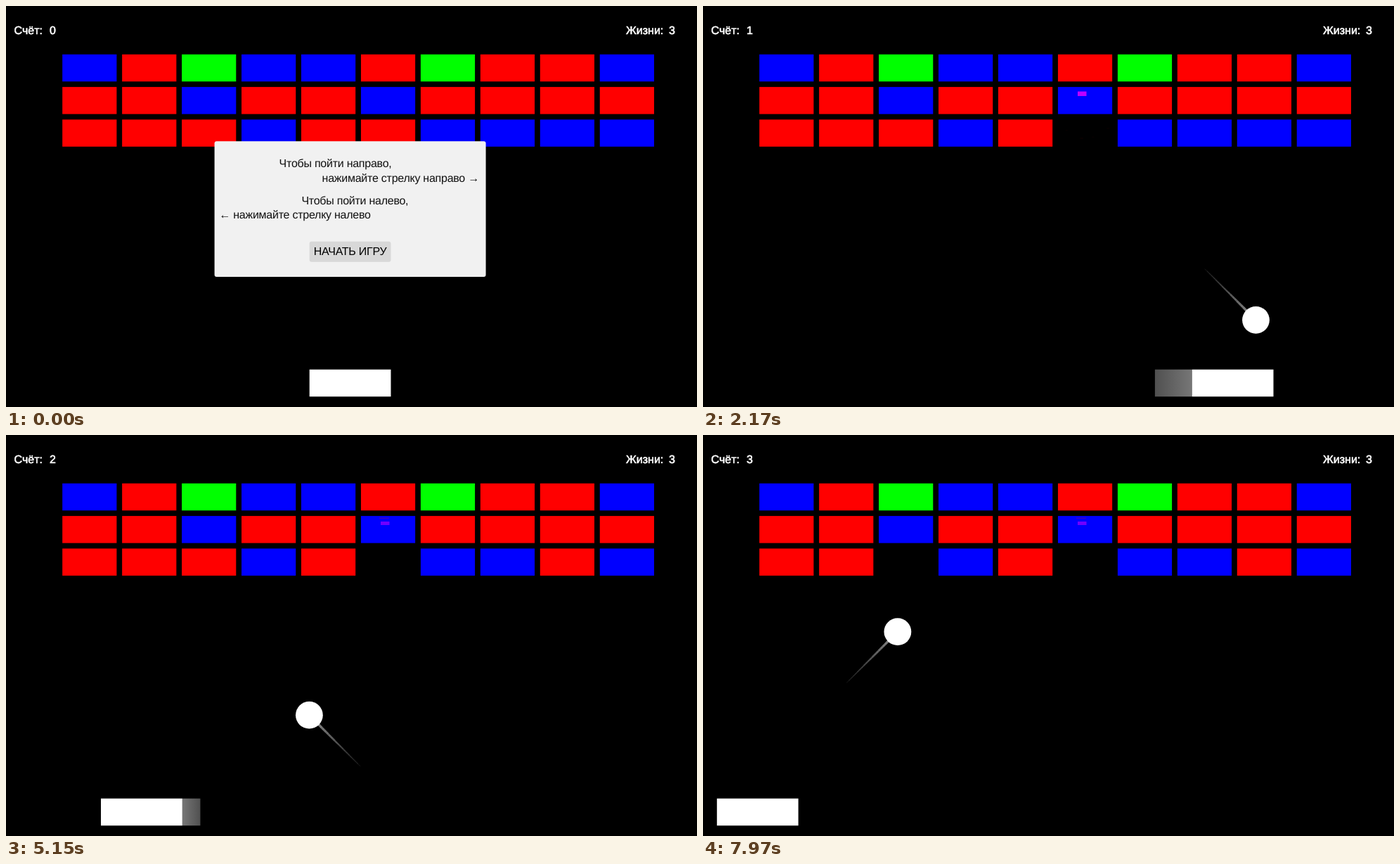
An HTML page with a canvas that plays this animation: 983x570 px, repeating every 8 s.

```html
<!DOCTYPE html>
<html lang="ru">
<head>
<meta charset="utf-8">
<title>Арканоид</title>
<style>
html, body { margin: 0; width: 100%; height: 100%; overflow: hidden; background: #000; }
canvas { display: block; }
</style>
</head>
<body>
<canvas id="stage" width="983" height="570"></canvas>
<script>
const ctx = document.getElementById('stage').getContext('2d');
const LOOP = 8000;
const TICK = 68.7;
const DIALOG_END = 13;
const SERVE = 14;

const BALL = { x: 489.5, y: 288.7, r: 19.4, speed: 16.5, tail: 4.4 };
const FIELD = { left: 15.9, right: 963.7, top: 219, bottom: 498 };
const BRICK = { x: 80.2, y: 68.8, w: 77.2, h: 38.5, dx: 84.95, dy: 46.3 };
const PADDLE = { x: 431.7, y: 516.7, w: 115.8, h: 38.5, speed: 52.8 };

const COLORS = { r: '#f00', g: '#0f0', b: '#00f' };
const ROWS = ['brgbbrgrrb', 'rrbrrbrrrr', 'rrrbrrbbbb'];

// Paddle moves: [start tick, x to reach].
const MOVES = [[27, 794], [54.86, 497.5], [67.62, 135], [88.6, 52.8], [92.3, 19.8]];

const clamp = (v, lo, hi) => Math.min(hi, Math.max(lo, v));

// Reflects a straight run between two walls.
function fold(v, lo, hi) {
  const span = hi - lo;
  const m = (((v - lo) % (2 * span)) + 2 * span) % (2 * span);
  return lo + (m < span ? m : 2 * span - m);
}

function ballAt(n) {
  const run = Math.max(0, n - SERVE) * BALL.speed;
  return [
    fold(BALL.x + run, FIELD.left, FIELD.right),
    fold(BALL.y - run, FIELD.top, FIELD.bottom)
  ];
}

function paddleAt(n) {
  return MOVES.reduce((x, [start, goal]) => {
    const reach = Math.max(0, n - start) * PADDLE.speed;
    return x + clamp(goal - x, -reach, reach);
  }, PADDLE.x);
}

// Every return to the top of the field strikes a brick in the last row.
const HITS = [0, 1, 2].map(k => {
  const run = BALL.y - FIELD.top + 2 * k * (FIELD.bottom - FIELD.top);
  const tick = SERVE + run / BALL.speed;
  const col = Math.floor((ballAt(tick)[0] - BRICK.x) / BRICK.dx);
  return { tick, col, broken: ROWS[2][col] === 'r' };
});

function random(seed) {
  const v = Math.sin(seed * 12.9898) * 43758.5453;
  return v - Math.floor(v);
}

function rect(x, y, w, h, color) {
  ctx.fillStyle = color;
  ctx.fillRect(x, y, w, h);
}

function panel(x, y, w, h, color) {
  ctx.fillStyle = color;
  ctx.beginPath();
  ctx.roundRect(x, y, w, h, 3);
  ctx.fill();
}

function text(str, x, y, color, spacing = '-0.25px') {
  ctx.font = '16px "Liberation Sans", Arial, sans-serif';
  ctx.textRendering = 'geometricPrecision';
  ctx.letterSpacing = spacing;
  ctx.fillStyle = color;
  ctx.fillText(str, x, y);
}

function label(str, x) {
  text(str, x, 40.3, '#fff', '0px');
  ctx.strokeStyle = '#fff';
  ctx.lineWidth = 0.6;
  ctx.strokeText(str, x, 40.3);
}

function drawBricks(n) {
  ROWS.forEach((row, r) => [...row].forEach((kind, c) => {
    const hit = r === 2 && HITS.find(h => h.col === c && n >= h.tick);
    if (hit && hit.broken) return;
    rect(BRICK.x + BRICK.dx * c, BRICK.y + BRICK.dy * r, BRICK.w, BRICK.h, COLORS[hit ? 'r' : kind]);
  }));
}

function drawDebris({ tick, col, broken }, n) {
  const age = (n - tick) / 14;
  if (!broken || age < 0 || age > 1) return;
  const cx = BRICK.x + BRICK.dx * col + BRICK.w / 2;
  const cy = BRICK.y + BRICK.dy * 2 + BRICK.h / 2;
  const spread = 1 - Math.exp(-age * 6);
  for (let i = 0; i < 4; i++) {
    const x = cx + (i * 20 - 30 + 8 * random(i + col)) * spread;
    const y = cy + (random(i + col * 7) * 28 - 20) * spread;
    const w = (6 + 9 * random(i + col * 3)) * (1.3 - age);
    const light = (0.6 + 0.4 * random(i * 5 + col)) * Math.min(1, 2 - 2 * age);
    rect(x - w / 2, y - w / 4, w, w / 2, `rgba(255,0,0,${light})`);
  }
}

// A stray bit of the first broken brick stays on the one above.
function drawStray(n) {
  if (n < HITS[0].tick + 3) return;
  const fresh = n < HITS[0].tick + 14;
  if (!fresh) rect(531, 117.5, 14, 1.5, '#3800c8');
  rect(533, fresh ? 121.5 : 123, 12.5, fresh ? 6.5 : 5, fresh ? '#bf00ff' : '#7000ff');
}

function drawBall(n) {
  const steps = 24;
  for (let i = 0; i < steps; i++) {
    const k = i / steps;
    ctx.strokeStyle = `rgba(255,255,255,${0.1 + 0.5 * k})`;
    ctx.lineWidth = 1 + 3.2 * k;
    ctx.beginPath();
    ctx.moveTo(...ballAt(n - BALL.tail * (1 - k)));
    ctx.lineTo(...ballAt(n - BALL.tail * (1 - k - 1 / steps)));
    ctx.stroke();
  }
  ctx.fillStyle = '#fff';
  ctx.beginPath();
  ctx.arc(...ballAt(n), BALL.r, 0, Math.PI * 2);
  ctx.fill();
}

function drawPaddle(n) {
  const { y, w, h } = PADDLE;
  const x = paddleAt(n), old = paddleAt(n - 1);
  if (old !== x) {
    const edge = old > x ? w : 0;
    const shade = ctx.createLinearGradient(x + edge, 0, old + edge, 0);
    shade.addColorStop(0, '#777');
    shade.addColorStop(1, '#505050');
    rect(x + edge, y, old - x, h, shade);
  }
  rect(x, y, w, h, '#fff');
}

function drawDialog() {
  panel(296.6, 192.2, 386, 192.8, '#f1f1f1');
  text('Чтобы пойти направо,', 388.6, 229, '#111');
  text('нажимайте стрелку направо →', 449.6, 250, '#111');
  text('Чтобы пойти налево,', 420.4, 282, '#111');
  text('← нажимайте стрелку налево', 303.3, 302, '#111');
  panel(431.7, 334.7, 115.8, 29, '#d8d8d8');
  ctx.textAlign = 'center';
  text('НАЧАТЬ ИГРУ', 489.6, 354, '#000');
  ctx.textAlign = 'left';
}

function drawPointer(n) {
  if (n < 1) return;
  const left = Math.pow(1 - Math.min(1, (n - 1) / 7), 2);
  ctx.save();
  ctx.translate(537 + 286 * left, 351 + 170 * left);
  ctx.fillStyle = '#fff';
  ctx.strokeStyle = '#000';
  ctx.lineWidth = 1;
  const arrow = new Path2D('M.5 .5v16l4-3.5 2.5 6 2.5-1-2.5-6h5z');
  ctx.fill(arrow);
  ctx.stroke(arrow);
  ctx.restore();
}

function draw(ms) {
  const n = Math.floor(ms / TICK + 0.45);
  rect(0, 0, 983, 570, '#000');
  label('Счёт:', 11.6);
  label(HITS.filter(h => n >= h.tick).length, 62);
  label('Жизни:', 882);
  label(3, 943);
  drawBricks(n);
  HITS.forEach(hit => drawDebris(hit, n));
  drawStray(n);
  drawPaddle(n);
  drawBall(n);
  if (n < DIALOG_END) {
    drawDialog();
    drawPointer(n);
  }
}

const begin = performance.now();
function loop() {
  draw((performance.now() - begin) % LOOP);
  requestAnimationFrame(loop);
}
loop();
</script>
</body>
</html>
```
